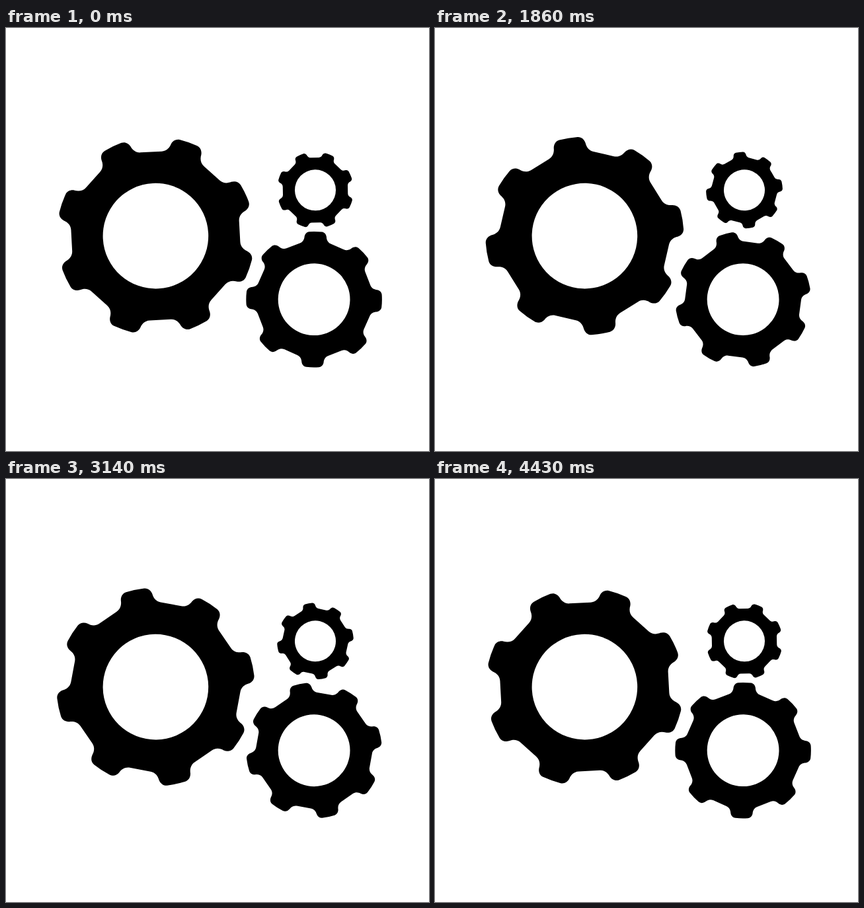
Write an HTML page that moves like this. It is 640x640 px and loops after 4.87 s.

```html
<!DOCTYPE html>
<html lang="en">
<head>
<meta charset="utf-8">
<title>Gears</title>
<style>
  html, body { margin: 0; width: 100%; height: 100%; overflow: hidden; background: #fff; }
  svg { display: block; width: 100%; height: 100%; }
</style>
</head>
<body>
<svg id="stage" viewBox="0 0 640 640" xmlns="http://www.w3.org/2000/svg"></svg>
<script>
const LOOP = 4870;
const FPS = 14;
// Turn out and back, in frames at FPS
const START = 11.1, PEAK = 37.7, END = 61.4;
const SWING = 180;
const TEETH = 8;

const gears = [
  { x: 226.4, y: 314.6, scale: 1, hole: 79.8, rest: 19.4, dir: 1 },
  { x: 466.1, y: 410.7, scale: 0.685, hole: 54.4, rest: 1.3, dir: -1 },
  { x: 468, y: 245.3, scale: 0.386, hole: 31, rest: 21.3, dir: 1 }
];

// Half a tooth pointing up: flat end, fillet, flank, rounded corner, crown
const profile = [[34, -123.7], [27, -126.6], [24.6, -133], [24.3, -138.5],
                 [23.5, -144], [20, -148.7], [14, -149.4]];
const CROWN = 150;

function gearPath({ scale, hole }) {
  let d = "";
  for (let i = 0; i < TEETH; i++) {
    const a = i * 2 * Math.PI / TEETH, c = Math.cos(a), s = Math.sin(a);
    const place = ([x, y]) =>
      ((x * c - y * s) * scale).toFixed(2) + " " + ((x * s + y * c) * scale).toFixed(2);
    const left = profile.map(([x, y]) => place([-x, y]));
    const right = profile.map(place).reverse();
    const r = CROWN * scale;
    d += (i ? "L" : "M") + left[0] + "C" + left.slice(1).join(" ") +
         `A${r} ${r} 0 0 1 ${right[0]}C` + right.slice(1).join(" ");
  }
  return d + `ZM${hole} 0A${hole} ${hole} 0 1 0 ${-hole} 0A${hole} ${hole} 0 1 0 ${hole} 0Z`;
}

const stage = document.getElementById("stage");
for (const gear of gears) {
  gear.node = document.createElementNS(stage.namespaceURI, "path");
  gear.node.setAttribute("d", gearPath(gear));
  gear.node.setAttribute("fill-rule", "evenodd");
  stage.append(gear.node);
}

function smooth(v) {
  v = Math.min(1, Math.max(0, v));
  return v * v * (3 - 2 * v);
}

function turnAt(ms) {
  const frame = Math.floor((ms + 5) * FPS / 1000);
  return SWING * (frame < PEAK
    ? smooth((frame - START) / (PEAK - START))
    : smooth((END - frame) / (END - PEAK)));
}

function render(ms) {
  const turn = turnAt(ms);
  for (const { node, x, y, rest, dir } of gears) {
    node.setAttribute("transform", `translate(${x} ${y}) rotate(${rest + dir * turn})`);
  }
}

const begin = performance.now();
function tick() {
  render((performance.now() - begin) % LOOP);
  requestAnimationFrame(tick);
}
tick();
</script>
</body>
</html>
```
